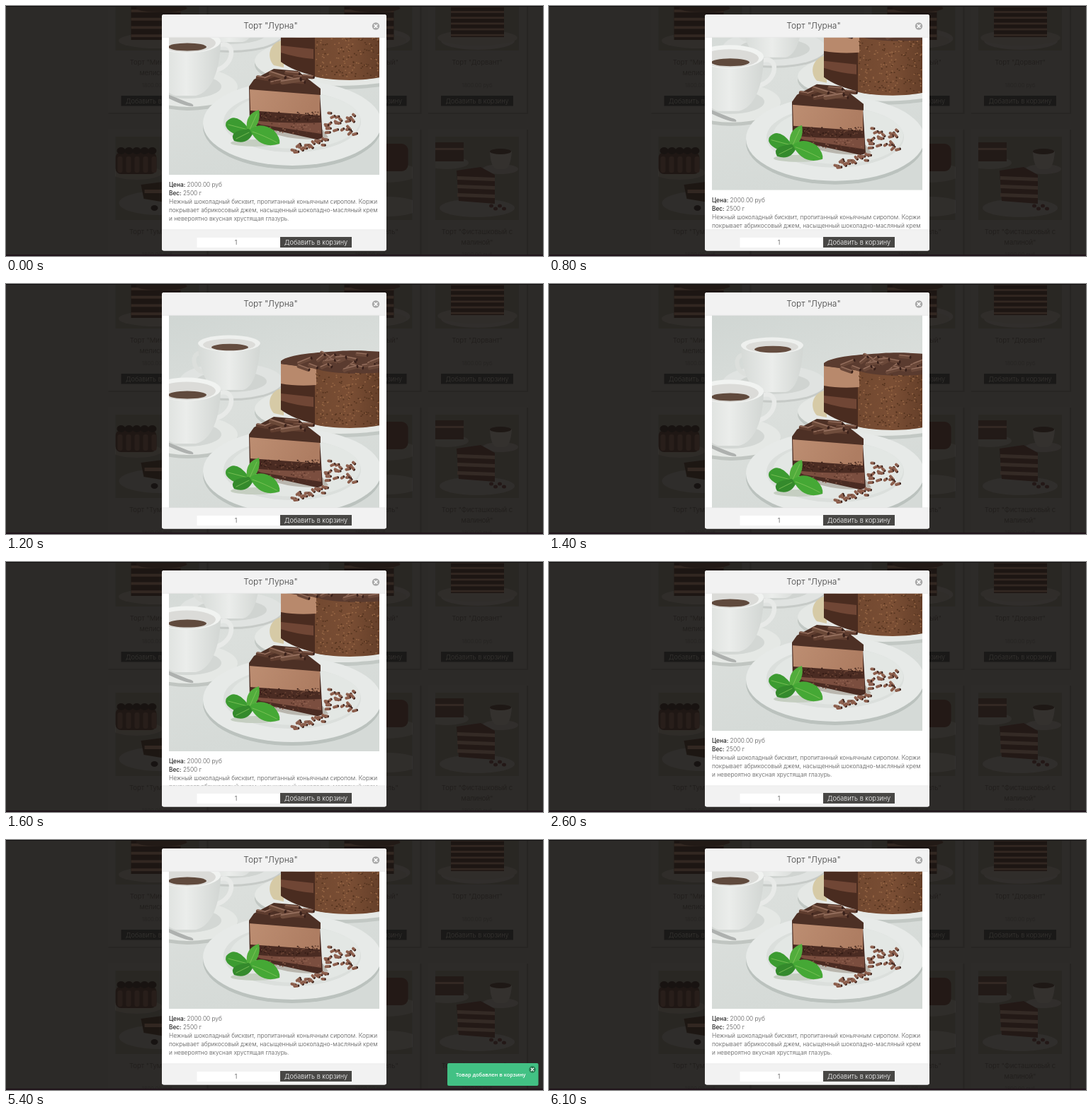
An HTML page that plays this animation: 758x354 px, repeating every 6.3 s.

```html
<!DOCTYPE html>
<html lang="ru">
<head>
<meta charset="utf-8">
<title>Корзина</title>
<style>
  html, body { margin: 0; width: 100%; height: 100%; overflow: hidden; background: #2c2a28; }
  svg { display: block; width: 100%; height: 100%; }
  text { font-family: Inter, "Open Sans", sans-serif; font-weight: 300; }
  .mid { text-anchor: middle; }
</style>
</head>
<body>
<svg id="stage" viewBox="0 0 758 354" xmlns="http://www.w3.org/2000/svg"></svg>
<script>
const LOOP = 6300, MAX_SCROLL = 102;

const rect = (x, y, w, h, fill, more = '') =>
  `<rect x="${x}" y="${y}" width="${w}" height="${h}" fill="${fill}" ${more}/>`;
const oval = (x, y, rx, ry, fill, more = '') =>
  `<ellipse cx="${x}" cy="${y}" rx="${rx}" ry="${ry}" fill="${fill}" ${more}/>`;
const path = (d, fill, more = '') => `<path d="${d}" fill="${fill}" ${more}/>`;
const line = (d, color, width) =>
  path(d, 'none', `stroke="${color}" stroke-width="${width}" stroke-linecap="round"`);
const text = (x, y, size, fill, str, more = '') =>
  `<text x="${x}" y="${y}" font-size="${size}" fill="${fill}" ${more}>${str}</text>`;
const mid = (x, y, size, fill, str) => text(x, y, size, fill, str, 'class="mid"');

let seed = 11;
const rnd = (a, b) => {
  seed = (seed * 16807) % 2147483647;
  return a + (b - a) * seed / 2147483647;
};
const repeat = (n, make) => Array.from({ length: n }, (_, i) => make(i)).join('');
const specks = (n, x1, x2, y1, y2, a, b) => repeat(n, i =>
  oval(rnd(x1, x2).toFixed(1), rnd(y1, y2).toFixed(1), 1.1, 0.9, i % 2 ? a : b));

// A rolled chocolate shaving with a light edge
function curl(x, y, len, thick, angle, tone = '#5f3d2f') {
  return `<g transform="translate(${x.toFixed(1)} ${y.toFixed(1)}) rotate(${angle.toFixed(0)})">` +
    rect(-len / 2, -thick / 2, len, thick, tone, `rx="${thick / 2}"`) +
    rect(-len / 2 + 1, -thick / 2 + 0.5, len - 2, thick / 4, '#96705f', 'rx="0.5"') +
    oval(len / 2 - 0.7, 0, thick / 4, thick / 2.4, '#38201a') + '</g>';
}

function closeIcon(x, y, r, fill, mark) {
  const k = r * 0.36;
  return oval(x, y, r, r, fill) +
    line(`M${x - k} ${y - k}L${x + k} ${y + k}M${x + k} ${y - k}L${x - k} ${y + k}`, mark, r * 0.3);
}

function cups() {
  return oval(318, 143, 73, 25, '#c6cac7') + oval(318, 140, 73, 25, '#e0e3e1') +
    oval(318, 141, 50, 15, '#d0d4d1') +
    line('M279 102C259 94 261 132 286 128', '#dcdfdc', 6) +
    path('M271 87C272 125 284 152 302 153H334C350 150 357 122 359 87Z', 'url(#cup)') +
    oval(315, 87, 44, 11.5, '#eef0ee') + oval(315, 89, 37, 8.5, '#dcdcd9') +
    oval(316, 92.5, 26, 4.8, '#654d40') +
    oval(258, 222, 69, 28, '#c0c5c1') + oval(258, 217, 69, 28, '#e5e8e5') +
    oval(256, 216, 48, 17, '#d3d7d4') +
    line('M297 159C327 145 325 191 290 194', '#e8eae8', 6.5) +
    path('M206 153C207 194 222 226 239 229H268C290 224 302 194 303 153Z', 'url(#cup)') +
    oval(255, 152, 48, 16.5, '#f1f3f1') + oval(255, 154.5, 41, 13, '#dbdbd8') +
    oval(256, 160, 27, 5.5, '#604a3d') +
    path('M226 226L258 239Q266 241 264 244Q254 245 226 231Z', '#aeb1af');
}

function wholeCake() {
  return oval(472, 185, 121, 35, '#c2c8c4') + oval(472, 180, 121, 35, '#e5e8e5') +
    path('M388 151C372 155 367 174 378 186L392 189V150Z', '#d6caa6') +
    path('M430 120H540V200C510 210 455 208 432 201Z', 'url(#side)') +
    path('M388 112L436 120V201Q405 194 388 181Z', '#4a2c20') +
    path('M388 116L438 122V146Q410 148 388 144Z', '#b8896c') +
    path('M388 158L434 163V177Q410 175 388 168Z', '#704635') +
    path('M388 112C400 102 440 100 470 98C500 96 540 99 540 101V127C500 132 455 130 438 123L388 116Z', '#5a3b2f') +
    specks(210, 438, 529, 129, 202, '#966644', '#55341f') +
    repeat(24, () => curl(rnd(412, 527), rnd(101, 123), rnd(13, 23), 5.5, rnd(-40, 40), '#6a4839'));
}

function slice() {
  return oval(404, 273, 126, 60, '#bbc2be') + oval(404, 268, 126, 60, '#e7eae8') +
    oval(404, 266, 97, 43, '#dbdfdc') + oval(408, 264, 92, 40, '#e3e7e4') +
    path('M348 270Q400 298 455 288L447 277L350 262Z', '#b9b6ae') +
    path('M343 216L443 225L447 288Q442 293 434 290L344 270Z', '#4a2b22') +
    path('M344 219L443 227V257L345 250Z', 'url(#mousse)') +
    path('M346 264Q395 269 445 267V283L360 270Z', '#7b4e3f') +
    path('M343 216L350 206L378 191L412 194L444 219V228L343 220Z', '#4d3025') +
    specks(80, 346, 443, 252, 265, '#341c15', '#684233') +
    specks(40, 370, 444, 268, 284, '#593529', '#8d5f4d') +
    repeat(9, i => curl(362 + i * 8 + rnd(-4, 4), 206 + rnd(-6, 6), rnd(14, 24), 5.5, rnd(-28, 24))) +
    curl(383, 200, 25, 6.5, 18, '#6b4938') + curl(402, 208, 30, 7, -9, '#704d3c') +
    curl(404, 197, 22, 5.5, 5, '#644132');
}

function mint() {
  const leaf = (d, vein, tone) => path(d, tone) + line(vein, '#84c65c', 0.8);
  return oval(352, 296, 35, 5, '#c5cec1') +
    leaf('M342 275Q324 251 311 266Q306 276 326 285Q340 284 342 275Z', 'M341 277L314 270', '#3c9b31') +
    leaf('M340 277Q337 255 357 249Q361 268 345 281Z', 'M344 277L354 255', '#52ad3c') +
    leaf('M342 276Q313 279 322 293Q342 300 350 279Z', 'M343 281L325 290', '#348a2c') +
    leaf('M344 277Q360 265 378 278Q388 289 386 297Q358 306 344 277Z', 'M348 280Q363 285 382 295', '#45a835');
}

function photo() {
  const crumb = (x, y) => curl(x, y, rnd(6, 10), 4, rnd(-50, 50), '#8a5a48');
  return rect(230, 44, 297, 297, 'url(#table)') +
    cups() + wholeCake() + slice() + mint() +
    repeat(22, i => crumb(469 + rnd(-24, 24), 255 + (i % 11) * 2.7 + rnd(-2, 2))) +
    repeat(16, i => crumb(407 + i * 3.1 + rnd(-2, 2), 306 - i * 0.8 + rnd(-5, 4)));
}

// Dimmed shop cards behind the dialog
const DARK = '#1f1c1a';
function card(col, row, titles, art) {
  const x = 143.5 + col * 150.5, y = -66 + row * 240, c = x + 70;
  return rect(x + 1, y + 1, 141, 218, '#272523') + rect(x, y, 140, 217, '#2d2b29') +
    `<svg x="${x + 11}" y="${y + 11}" width="118" height="118">${rect(0, 0, 118, 118, '#373430')}${art}` +
    rect(0, 0, 118, 118, '#1a1714', 'opacity=".45"') + '</svg>' +
    titles.map((s, i) => mid(c, y + 149 + i * 14.5, 9.6, DARK, s)).join('') +
    mid(c, y + 181, 7.5, '#252321', '1800.00 руб') +
    rect(x + 19, y + 193, 102, 14.5, '#1a1918') +
    mid(c, y + 203.7, 9.2, '#383633', 'Добавить в корзину');
}

const layers = (x, y, w, h, n) => oval(x + w / 2, y + h + 1, w * 0.75, 11, '#43403c') +
  rect(x, y, w, h, '#211613') +
  repeat(n, i => rect(x, y + 4 + i * h / n, w, h / n / 3, '#46342b'));
const miniCup = (x, y) => oval(x + 15, y + 25, 25, 7, '#45423f') +
  path(`M${x} ${y}h31q-2 25 -11 25h-10q-9 -2 -10 -25z`, '#4a4744') + oval(x + 15, y, 15, 4, '#231a16');

function cards() {
  const tall = layers(22, 56, 70, 47, 4) + oval(65, 58, 36, 6, '#2a1d18');
  const twin = oval(30, 51, 36, 10, '#413d39') + rect(0, 22, 58, 31, '#241814', 'rx="8"') +
    repeat(5, i => rect(3 + i * 12, 28, 7, 23, '#35251e', 'rx="3"')) +
    repeat(5, i => oval(8 + i * 11, 20, 6, 5, '#17110f')) +
    oval(62, 94, 57, 17, '#42403d') + path('M36 68L82 62V95L40 88Z', '#211713') +
    rect(41, 75, 40, 5, '#46352c') + oval(55, 101, 5, 4, '#151111');
  const round = oval(78, 51, 50, 14, '#42403c') + rect(54, 10, 58, 39, '#2b1b17', 'rx="9"') +
    oval(82, 99, 48, 14, '#43413e');
  const raspberry = miniCup(77, 21) + oval(16, 37, 31, 9, '#44413e') + rect(0, 8, 40, 27, '#2a1d1a') +
    rect(0, 16, 40, 3, '#48372f') + oval(59, 101, 53, 13, '#44423f') +
    path('M30 48L64 43L84 54V95L33 91Z', '#2b1b18') +
    repeat(3, i => path(`M31 ${56 + i * 12}L84 ${58 + i * 12}v5L31 ${61 + i * 12}Z`, '#4b3b32')) +
    repeat(4, i => oval(79 + i * 6, 98 + (i % 2) * 4, 3, 2.5, '#2b1a19'));
  return card(0, 0, ['Торт "Миндаль с', 'мелиссой"'], tall) +
    card(2, 0, ['Торт "Ореховый"'], oval(65, 101, 50, 14, '#45423f') + tall) +
    card(3, 0, ['Торт "Дорвант"'], oval(60, 104, 52, 13, '#45423f') + layers(22, 50, 75, 49, 6)) +
    card(0, 1, ['Торт "Туманный"'], twin) +
    card(2, 1, ['Торт "Карамель"'], round) +
    card(3, 1, ['Торт "Фисташковый с', 'малиной"'], raspberry);
}

function details() {
  const row = (y, label, value) => `<text x="230" y="${y}" font-size="8.3" fill="#555">` +
    `<tspan font-weight="500" fill="#222">${label}</tspan> ${value}</text>`;
  return row(358, 'Цена:', '2000.00 руб') + row(370, 'Вес:', '2500 г') +
    ['Нежный шоколадный бисквит, пропитанный коньячным сиропом. Коржи',
     'покрывает абрикосовый джем, насыщенный шоколадно-масляный крем',
     'и невероятно вкусная хрустящая глазурь.']
      .map((s, i) => text(230, 382 + i * 12, 8.35, '#555', s)).join('');
}

function dialog() {
  return rect(220, 12, 317, 334.5, '#fff', 'rx="3"') +
    `<g clip-path="url(#body)"><g id="scroll"><g clip-path="url(#frame)">${photo()}</g>${details()}</g></g>` +
    path('M220 44.5V15Q220 12 223 12H534Q537 12 537 15V44.5Z', '#f2f2f2') +
    rect(220, 43.8, 317, 0.7, '#e6e6e6') +
    mid(373.5, 32.3, 12, '#3e3e3e', 'Торт "Лурна"') +
    closeIcon(522, 28.5, 5.2, '#aaa', '#fff') +
    path('M220 317H537V343.5Q537 346.5 534 346.5H223Q220 346.5 220 343.5Z', '#f2f2f2') +
    rect(220, 316.5, 317, 0.7, '#e6e6e6') +
    rect(269.5, 328, 117.5, 14, '#fff') + mid(324.5, 338, 9, '#444', '1') +
    rect(387, 327, 101, 15, '#484745') + mid(437.5, 337.9, 9.2, '#fff', 'Добавить в корзину');
}

const toast = () => '<g id="toast">' + rect(623, 316, 128.5, 32, '#42c184', 'rx="2"') +
  text(635, 334.8, 7.4, '#fff', 'Товар добавлен в корзину',
    'style="font-family:\'Open Sans\',sans-serif;font-weight:600"') +
  closeIcon(743, 325, 4.7, '#26784f', '#fff') + '</g>';

const grad = (id, dir, ...stops) => `<linearGradient id="${id}" x1="0" y1="0" ${dir}>` +
  stops.map((c, i) => `<stop offset="${i / (stops.length - 1)}" stop-color="${c}"/>`).join('') +
  '</linearGradient>';
const clip = (id, y, h) => `<clipPath id="${id}">${rect(230, y, 297, h, '#000')}</clipPath>`;

const stage = document.getElementById('stage');
stage.innerHTML = '<defs>' +
  grad('table', 'x2="0.3" y2="1"', '#d0d6d3', '#dbdfdc', '#d5dad7') +
  grad('cup', 'x2="1" y2="0"', '#d6dad7', '#ebedeb', '#d2d6d3') +
  grad('side', 'x2="1" y2="0"', '#714830', '#7a4e34', '#5f3b26') +
  grad('mousse', 'x2="1" y2="0.2"', '#bd8e72', '#ae7d62') +
  clip('body', 44, 273) + clip('frame', 44, 297) + '</defs>' +
  rect(0, 0, 758, 354, '#2c2a28') + cards() +
  rect(0, 0, 758, 1, '#100e0e') + rect(0, 352, 758, 2, '#1f131a') +
  dialog() + toast();

const scroller = document.getElementById('scroll');
const note = document.getElementById('toast');
const clamp = v => Math.min(1, Math.max(0, v));
// Fast start with a long glide, as in wheel scrolling
const glide = (t, start, length) => 1 - (1 - clamp((t - start) / length)) ** 3;

function draw(now) {
  const t = Math.floor((now % LOOP) / 100) * 100;
  const y = MAX_SCROLL * (1 - glide(t, 750, 650) + glide(t, 1400, 585));
  scroller.setAttribute('transform', `translate(0 ${-y.toFixed(2)})`);
  note.setAttribute('opacity', t < 3800 ? 0 : clamp((6100 - t) / 300));
}

const begin = performance.now();
function tick() {
  draw(performance.now() - begin);
  requestAnimationFrame(tick);
}
tick();
</script>
</body>
</html>
```
